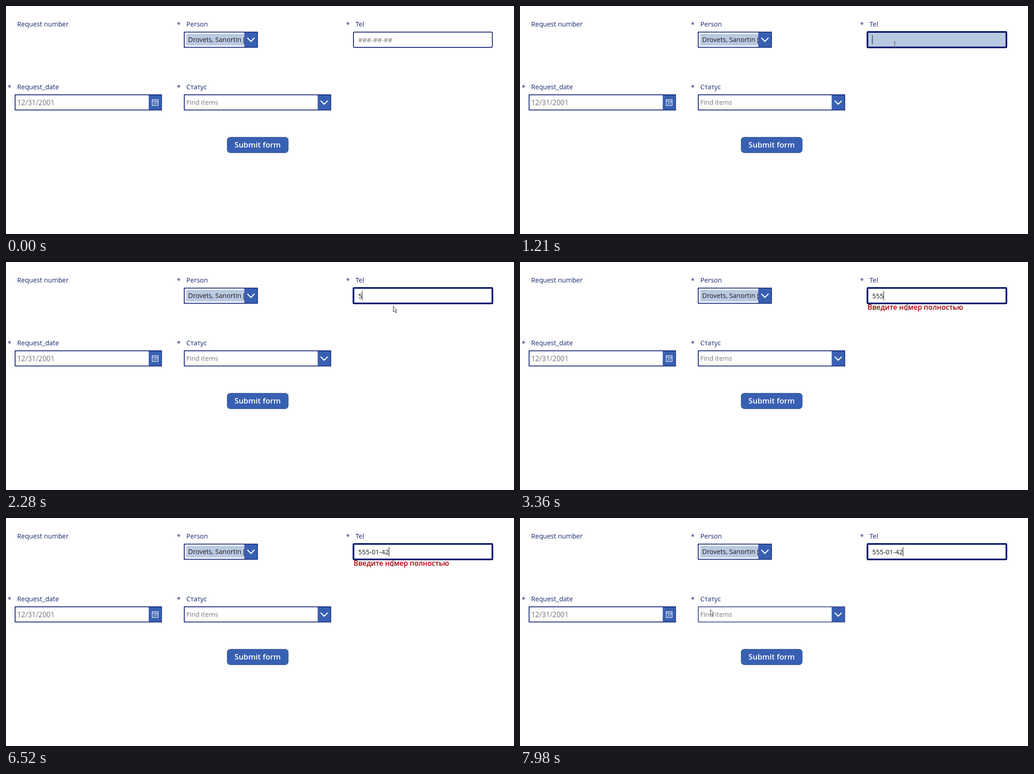
Recreate the animation shown at these times as an HTML page. Size 1117 px wide and 501 px high, loop 8000 ms.

```html
<!DOCTYPE html>
<html lang="en">
<head>
<meta charset="utf-8">
<style>
  html, body { margin: 0; width: 100%; height: 100%; overflow: hidden; background: #fff; }
  svg { display: block; width: 1117px; height: 501px; font: 14.5px "Open Sans", "Noto Sans", sans-serif; }
  .label { fill: #14246e; }
  .hint { fill: #767676; }
  .value { fill: #1a1a1a; }
  .box { fill: #fff; stroke: #00126b; stroke-width: 1.7; }
  .blue { fill: #3860b2; }
  .line { fill: none; stroke: #fff; }
</style>
</head>
<body>
<svg viewBox="0 0 1117 501">
  <defs>
    <path id="chevron" class="line" d="M-7.8 -4 L0 3.8 L7.8 -4" stroke-width="2.4"/>
  </defs>

  <g class="label">
    <text x="24.6" y="44.6">Request number</text>
    <text x="396.6" y="44.6">Person</text>
    <text x="768.6" y="44.6">Tel</text>
    <text x="24.6" y="182.6">Request_date</text>
    <text x="396.6" y="182.6">Статус</text>
    <text x="375.7" y="46">*</text>
    <text x="747.7" y="46">*</text>
    <text x="3.7" y="184">*</text>
    <text x="375.7" y="184">*</text>
  </g>

  <!-- Person -->
  <rect class="box" x="391.9" y="57.4" width="161" height="33.3"/>
  <rect x="396.5" y="61.2" width="128" height="25.6" fill="#bac9e2"/>
  <text class="value" x="400.6" y="79">Drovets, Sanortin [</text>
  <rect class="blue" x="524" y="58" width="28.3" height="32"/>
  <use href="#chevron" x="538.5" y="74"/>

  <!-- Request date -->
  <rect class="box" x="20" y="195.2" width="322" height="33.3"/>
  <text class="hint" x="24.5" y="218.2" font-size="15.5">12/31/2001</text>
  <rect class="blue" x="313.8" y="196" width="28" height="32"/>
  <path class="line" d="M321.5 205.8 h13 v12.8 h-13 Z M321.5 209.3 h13" stroke-width="1.2"/>
  <path class="line" d="M326 212.3 h7 M324 215.3 h7" stroke-width="1.6" stroke-dasharray="1.6 1.1"/>

  <!-- Status -->
  <rect class="box" id="status" x="392" y="195.2" width="322" height="33.3"/>
  <text class="hint" x="396.4" y="217">Find items</text>
  <rect class="blue" x="685.3" y="196" width="28" height="32"/>
  <use href="#chevron" x="699.7" y="212"/>

  <!-- Submit -->
  <rect x="486.3" y="288.3" width="134.4" height="34.2" rx="7" fill="#3860b2" stroke="#2d5093"/>
  <text x="553.3" y="311" font-size="16.8" font-weight="600" fill="#fff" text-anchor="middle">Submit form</text>

  <!-- Tel -->
  <rect class="box" id="tel"/>
  <text id="telText" x="774.5" y="80"></text>
  <rect id="caret" y="64" width="1.2" height="20" fill="#222"/>
  <text id="error" x="764.2" y="105.3" font-size="15.5" font-weight="600" fill="#a80000">Введите номер полностью</text>

  <g id="pointer">
    <path id="arrow" d="M0.5 0.5 V12.5 L3.2 10 L5.4 15 L7.4 14.1 L5.2 9.2 H8.7 Z" fill="#fff" stroke="#333" stroke-linejoin="round"/>
    <path id="beam" d="M-3 -5.5 H-0.8 L0 -5 L0.8 -5.5 H3 M0 -5 V5 M-3 5.5 H-0.8 L0 5 L0.8 5.5 H3" fill="none" stroke="#555"/>
  </g>
</svg>
<script>
const LOOP = 8000, FOCUS_AT = 1170, LEAVE_AT = 1540;
const el = id => document.getElementById(id);
const [status, tel, telText, caret, error, pointer, arrow, beam] =
  ['status', 'tel', 'telText', 'caret', 'error', 'pointer', 'arrow', 'beam'].map(el);

// The input mask adds each dash a moment after the digit is typed.
const typing = [
  [0, ''], [2280, '5'], [2790, '55'], [3360, '555'], [3650, '5550'], [3730, '555-0'],
  [4240, '555-01'], [4650, '555-014'], [4700, '555-01'], [6190, '555-014'],
  [6240, '555-01-4'], [6520, '555-01-42']
];
const caretOff = [[1720, 2280], [5210, 5780], [7060, 7560]];

// Pointer stops: time, x, y, easing of the move that ends there.
const easeOut = u => 1 - (1 - u) ** 2;
const smooth = u => u * u * (3 - 2 * u);
const hold = () => 0;
const stops = [
  [310, 1079, 486], [760, 837, 87, smooth], [1070, 824, 85, easeOut],
  [LEAVE_AT, 851, 97, hold], [7770, 851, 97, hold], [7980, 418, 201, smooth], [LOOP, 418, 201, hold]
];

const during = (t, [from, to]) => t >= from && t < to;
const inside = ([x, y], left, top, right, bottom) => x >= left && x <= right && y >= top && y <= bottom;
const show = (node, on) => node.setAttribute('visibility', on ? 'visible' : 'hidden');

function set(node, attributes) {
  for (const name in attributes) node.setAttribute(name, attributes[name]);
}

function pointerAt(t) {
  const i = stops.findIndex(stop => stop[0] > t);
  const [t0, x0, y0] = stops[i - 1];
  const [t1, x1, y1, ease] = stops[i];
  const u = ease((t - t0) / (t1 - t0));
  return [x0 + (x1 - x0) * u, y0 + (y1 - y0) * u];
}

function draw(t) {
  const focused = t >= FOCUS_AT;
  const typed = typing.findLast(([at]) => at <= t)[1];
  const hasError = during(t, [2360, 6600]);
  const at = t < stops[0][0] ? null : pointerAt(t);
  const overTel = at !== null && inside(at, 763, 57, 1070, 91);
  const overStatus = at !== null && inside(at, 391, 194, 715, 230);

  set(tel, focused
    ? { x: 764, y: 57, width: 305.5, height: 34, rx: 1.5 }
    : { x: 764, y: 57.4, width: 305.4, height: 33.4, rx: 1.5 });
  tel.style.strokeWidth = focused ? 3.6 : 1.7;
  tel.style.fill = overTel ? '#bac9e2' : '#fff';
  status.style.stroke = overStatus ? '#334188' : '';

  telText.textContent = focused ? typed : '###-##-##';
  telText.setAttribute('class', focused ? 'value' : 'hint');
  caret.setAttribute('x', 774.2 + (focused && typed ? telText.getComputedTextLength() : 0));
  show(caret, focused && !caretOff.some(span => during(t, span)));
  show(error, hasError);

  const textCursor = overTel || hasError;
  show(arrow, at && !textCursor);
  show(beam, at && textCursor);
  if (at) {
    const drop = hasError ? 3 : 0;
    pointer.setAttribute('transform', `translate(${Math.round(at[0])} ${Math.round(at[1]) + drop})`);
  }
}

function tick() {
  draw(performance.now() % LOOP);
  requestAnimationFrame(tick);
}
tick();
</script>
</body>
</html>
```
